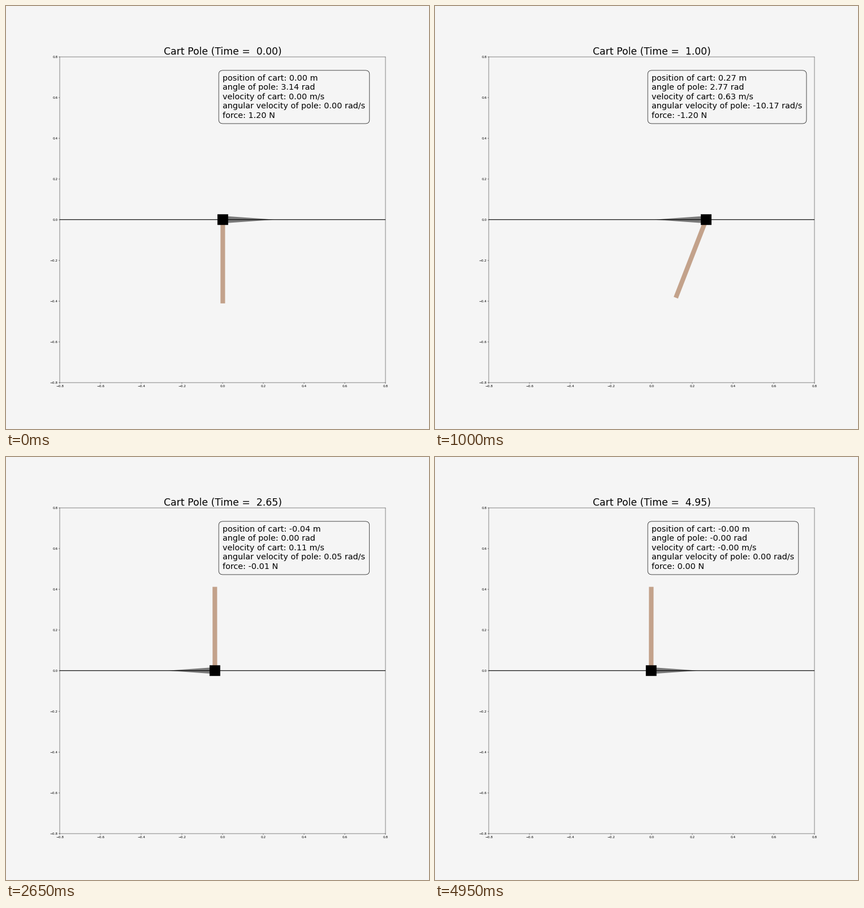
Recreate the animation shown at these times as a matplotlib script. Size 748 px wide and 748 px high, loop 5000 ms.

```python
import math

import numpy as np
import matplotlib.pyplot as plt
from matplotlib.animation import FuncAnimation
from matplotlib.patches import Polygon

FRAMES, STEP = 100, 0.05
PAPER = "whitesmoke"
POLE_COLOR = (195 / 255, 162 / 255, 139 / 255)
CART, POLE_LEN, POLE_WIDTH = 0.0525, 0.4115, 0.0226
HEAD_LEN, HEAD_HALF, FORCE_SCALE = 0.23, 0.0165, 0.02
MAX_FORCE = 1.2
FLIPS = (0.3, 0.76, 0.97)  # times when the swing-up push changes side
CATCH = 1.35               # time when the pole reaches the top
COUPLING = 0.09            # pole mass share times distance to its centre

# Key poses: time, cart position, its velocity, pole angle, angular velocity.
# The angle is 0 upright and grows counter-clockwise.
POSES = [
    (0.0, 0.0, 0.0, math.pi, 0.0),
    (0.3, 0.239, 1.267, 2.36, -1.76),
    (0.7, 0.227, -0.42, 4.743, -0.42),
    (CATCH, 0.096, -0.89, 0.01, -2.13),
    (1.55, -0.008, -0.32, -0.10, 0.08),
    (2.15, -0.0815, 0.04, -0.036, 0.10),
    (3.2, 0.0095, 0.04, 0.013, -0.003),
    (4.15, 0.0075, -0.02, -0.002, -0.01),
    (4.95, -0.003, -0.003, -0.001, 0.002),
]


def cubic(s, h, y0, v0, y1, v1):
    """Value and slope at share s of a span h with given ends."""
    rise = y1 - y0
    value = (y0 + s * s * (3 - 2 * s) * rise
             + h * s * (1 - s) * ((1 - s) * v0 - s * v1))
    slope = (6 * s * (1 - s) * rise / h
             + (1 - s) * (1 - 3 * s) * v0 + s * (3 * s - 2) * v1)
    return value, slope


def centre(x, v, angle, spin):
    """Centre of mass of cart and pole, and its velocity."""
    return (x - COUPLING * math.sin(angle),
            v - COUPLING * math.cos(angle) * spin)


def motion(t):
    """The centre of mass moves smoothly; the cart recoils from the pole."""
    i = max(k for k, pose in enumerate(POSES[:-1]) if pose[0] <= t + 1e-9)
    (t0, *a), (t1, *b) = POSES[i], POSES[i + 1]
    h = t1 - t0
    s = (t - t0) / h
    angle, spin = cubic(s, h, *a[2:], *b[2:])
    mid, drift = cubic(s, h, *centre(*a), *centre(*b))
    x = mid + COUPLING * math.sin(angle)
    v = drift + COUPLING * math.cos(angle) * spin
    return x, v, angle, spin


def push(t):
    """Full force from side to side, then a fading catch and a short brake."""
    if t < 1.22:
        return MAX_FORCE * (-1) ** sum(t > flip - 1e-9 for flip in FLIPS)
    catch = 0.76 * math.exp(-max(t - CATCH, 0) / 0.36)
    brake = 0.034 if 2.4 < t < 3.25 else 0
    return catch - brake


def wrap(angle):
    return math.pi - (math.pi - angle) % (2 * math.pi)


def cart_points(x):
    h = CART / 2
    return [(x - h, -h), (x + h, -h), (x + h, h), (x - h, h)]


def pole_points(x, angle):
    along = np.array([-math.sin(angle), math.cos(angle)])
    side = np.array([along[1], -along[0]]) * POLE_WIDTH / 2
    foot = np.array([x, 0])
    tip = foot + POLE_LEN * along
    return [foot - side, foot + side, tip + side, tip - side]


def arrow_points(x, force):
    base = x + FORCE_SCALE * force
    tip = base + math.copysign(HEAD_LEN, force)
    return [(base, HEAD_HALF), (tip, 0), (base, -HEAD_HALF)]


fig, ax = plt.subplots(figsize=(18, 18), dpi=41.5556, facecolor=PAPER)
ax.set_facecolor(PAPER)
ax.set_aspect("equal")
ax.set_xlim(-0.8, 0.8)
ax.set_ylim(-0.8, 0.8)
ticks = np.round(np.linspace(-0.8, 0.8, 9), 1)
ax.set_xticks(ticks)
ax.set_yticks(ticks)


def add_shape(color, **style):
    shape = Polygon(np.zeros((3, 2)), fc=color, lw=0, snap=False, **style)
    return ax.add_patch(shape)


ax.plot([-0.8, 0.8], [0, 0], color="black", lw=2, snap=False)
arrow = add_shape("black", alpha=0.5)
pole = add_shape(POLE_COLOR)
cart = add_shape("black")
title = ax.set_title("", fontsize=30)
info = ax.text(0, 0.5, "", fontsize=25, linespacing=1.22,
               bbox=dict(boxstyle="round,pad=0.5", fc=PAPER, ec="black",
                         lw=1.2))


def update(frame):
    t = frame * STEP
    x, v, angle, spin = motion(t)
    force = push(t)
    cart.set_xy(cart_points(x))
    pole.set_xy(pole_points(x, angle))
    arrow.set_xy(arrow_points(x, force))
    title.set_text(f"Cart Pole (Time = {t:5.2f})")
    info.set_text(
        f"position of cart: {x:.2f} m\n"
        f"angle of pole: {wrap(angle):.2f} rad\n"
        f"velocity of cart: {v:.2f} m/s\n"
        f"angular velocity of pole: {spin:.2f} rad/s\n"
        f"force: {force:.2f} N"
    )
    return cart, pole, arrow, title, info


anim = FuncAnimation(fig, update, frames=FRAMES, interval=50,
                     repeat=True, repeat_delay=0, blit=False)
plt.show()
```
